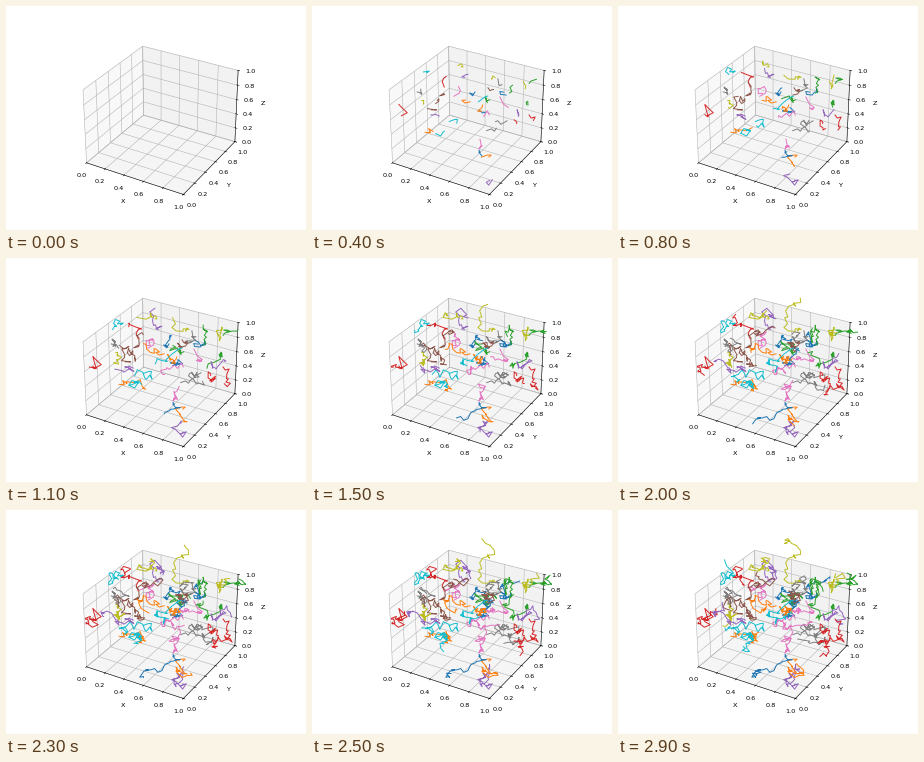
Animation of 300x224 px, one loop 3 s. Source, as a matplotlib script:

```python
import matplotlib.pyplot as plt
import numpy as np
from matplotlib.animation import FuncAnimation

WIDTH, HEIGHT = 300, 224
DPI = WIDTH / 6.4
STEPS = 30
WALKS = 40

np.random.seed(19680801)


def random_walk(steps, max_step=0.05):
    start = np.random.random(3)
    moves = np.random.uniform(-max_step, max_step, size=(steps, 3))
    return start + np.cumsum(moves, axis=0)


walks = [random_walk(STEPS) for _ in range(WALKS)]

fig = plt.figure(figsize=(WIDTH / DPI, HEIGHT / DPI), dpi=DPI)
ax = fig.add_subplot(projection="3d")
lines = [ax.plot([], [], [])[0] for _ in walks]
ax.set(xlim3d=(0, 1), xlabel="X",
       ylim3d=(0, 1), ylabel="Y",
       zlim3d=(0, 1), zlabel="Z")


def update(num):
    for line, walk in zip(lines, walks):
        line.set_data_3d(walk[:num].T)
    return lines


ani = FuncAnimation(fig, update, frames=STEPS, interval=100,
                    repeat=True, repeat_delay=0)
plt.show()
```
